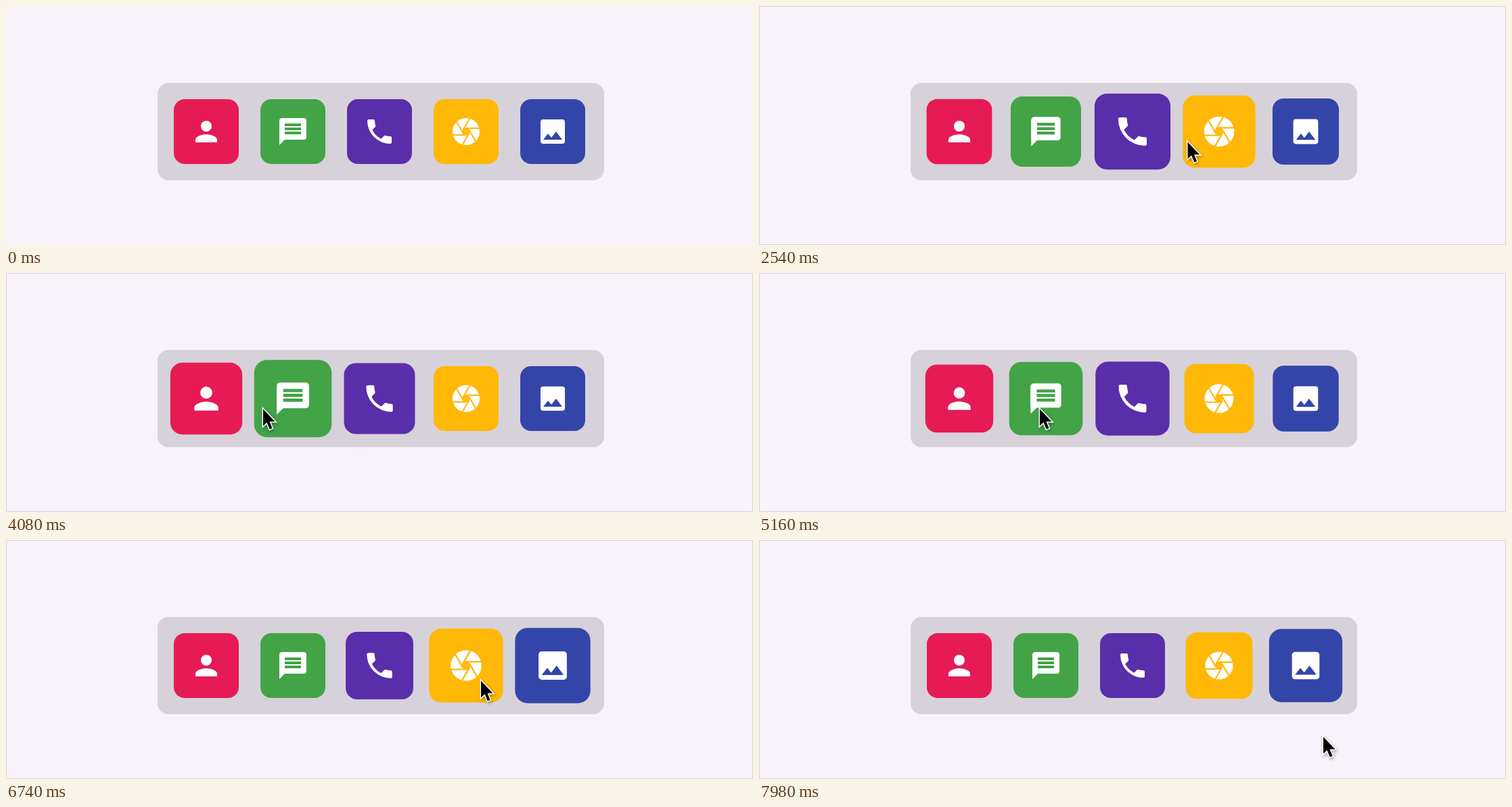
These frames come from a looping animation (1104x354 px, 8 s). An HTML page with a canvas:

```html
<!DOCTYPE html>
<html lang="en">
<head>
<meta charset="utf-8">
<title>Dock hover</title>
<style>
  html, body { margin: 0; width: 1104px; height: 354px; overflow: hidden; background: #f8f3fb; }
  canvas { display: block; }
</style>
</head>
<body>
<canvas id="stage" width="1104" height="354"></canvas>
<script>
const ctx = document.getElementById('stage').getContext('2d');
const LOOP = 8000, TRANSITION = 300, BORDER_AT = 2500, POINTER_AT = 1300;
const PAPER = '#f8f3fb', PANEL = '#d7d1da', WHITE = '#fff';
const FIRST_CELL = 232, PITCH = 128, MID_X = 552, MID_Y = 186, PANEL_BOTTOM = 256;

function fillRound(x, y, w, h, r, color) {
  ctx.fillStyle = color;
  ctx.beginPath();
  ctx.roundRect(x, y, w, h, r);
  ctx.fill();
}

function fillDisc(x, y, r) {
  ctx.fillStyle = WHITE;
  ctx.beginPath();
  ctx.arc(x, y, r, 0, 2 * Math.PI);
  ctx.fill();
}

function fillPath(d, color) {
  ctx.fillStyle = color;
  ctx.fill(new Path2D(d));
}

// Glyphs are drawn on a 24 unit grid; color is that of the tile behind.
function person() {
  fillDisc(12, 8, 4);
  fillPath('M12 14c-2.67 0-8 1.34-8 4v2h16v-2c0-2.66-5.33-4-8-4z', WHITE);
}

function message(color) {
  fillRound(2, 2, 20, 16, 2, WHITE);
  fillPath('M2 4V22L6 18L8 12Z', WHITE);
  for (let y = 6; y <= 12; y += 3) fillRound(6, y, 12, 2, 0, color);
}

function phone() {
  fillPath('M6.62 10.79q2.2 4.4 6.59 6.59l2.2-2.2q.45-.4 1.02-.24q1.7.57 3.57.57q1 0 1 1V20q0 1-1 1A17 17 0 0 1 3 4q0-1 1-1h3.5q1 0 1 1q0 1.9.57 3.57q.15.6-.25 1.02z', WHITE);
}

function shutter(color) {
  fillDisc(12, 12, 10);
  ctx.translate(12, 12);
  ctx.fillStyle = color;
  for (let i = 0; i < 6; i++) {
    ctx.rotate(Math.PI / 3);
    ctx.fillRect(0, -3, 10.5, 1);
    ctx.beginPath();
    ctx.moveTo(0, 0);
    ctx.lineTo(0, -3);
    ctx.lineTo(2.6, -1.5);
    ctx.fill();
  }
}

function picture(color) {
  fillRound(3, 3, 18, 18, 2, WHITE);
  fillPath('M8.5 13.5l2.5 3L14.5 12l4.5 6H5z', color);
}

const icons = [
  ['#e61b55', person], ['#43a347', message], ['#592eaa', phone],
  ['#ffb805', shutter], ['#3445aa', picture]
].map(([color, glyph], i) => ({ color, glyph, x: 296 + i * PITCH, steps: [] }));

const arrow = new Path2D('M0 0V25L5.5 19.8L9.8 30L13.6 28.4L9.5 18.4H17.5Z');

// Pointer way points as [time, position]: turns of each sweep and a few between.
const pathX = [
  [1300, 136], [1700, 147], [1800, 152], [2600, 640], [3103, 360], [3240, 276],
  [3440, 250], [3876, 360], [4080, 379], [4760, 720], [5160, 414], [5380, 252],
  [6440, 846], [6740, 701], [7100, 530], [7700, 850], [7980, 833]
];
const pathY = [
  [1300, 360], [1700, 319], [1800, 314], [2050, 200], [5160, 200],
  [6740, 207], [7700, 212], [7980, 290]
];

function slope(path, i) {
  const a = path[i], b = path[i + 1];
  return a && b ? (b[1] - a[1]) / (b[0] - a[0]) : 0;
}

// The harmonic mean of neighbouring slopes keeps the curve free of overshoot.
function tangent(path, i) {
  const before = slope(path, i - 1), after = slope(path, i);
  return before * after > 0 ? 2 * before * after / (before + after) : 0;
}

function along(path, t) {
  const next = path.findIndex(p => p[0] > t);
  if (next <= 0) return path.at(next)[1];
  const i = next - 1, a = path[i], b = path[next];
  const span = b[0] - a[0], u = (t - a[0]) / span, v = 1 - u;
  return a[1] * (1 + 2 * u) * v * v + b[1] * u * u * (3 - 2 * u)
    + span * u * v * (tangent(path, i) * v - tangent(path, next) * u);
}

// The CSS "ease" curve.
function ease(p) {
  if (p >= 1) return 1;
  let lo = 0, hi = 1;
  for (let i = 0; i < 20; i++) {
    const s = (lo + hi) / 2;
    if (0.75 * s * (1 - s) + s ** 3 < p) lo = s; else hi = s;
  }
  return 0.3 * lo * (1 - lo) ** 2 + 3 * lo * lo * (1 - lo) + lo ** 3;
}

function scaleAt(icon, t) {
  const step = icon.steps.findLast(s => s.t <= t);
  return step ? step.from + (step.to - step.from) * ease((t - step.t) / TRANSITION) : 1;
}

// Cells beyond either end stand for the pointer being off the icons.
function hoveredAt(t) {
  const x = along(pathX, t);
  if (along(pathY, t) >= PANEL_BOTTOM) return x < MID_X ? -2 : icons.length;
  return Math.max(-2, Math.floor((x - FIRST_CELL) / PITCH) - (x < FIRST_CELL));
}

// The hovered icon grows to 1.2, its neighbours to 1.1.
function planTransitions() {
  let current = -2;
  for (let t = 0; t < LOOP; t += 2) {
    const next = hoveredAt(t);
    if (next === current) continue;
    current = next;
    icons.forEach((icon, i) => {
      const to = 1 + Math.max(0, 2 - Math.abs(i - current)) / 10;
      icon.steps.push({ t, from: scaleAt(icon, t), to });
    });
  }
}

function drawIcon(icon, t) {
  const k = scaleAt(icon, t);
  ctx.save();
  ctx.translate(icon.x, MID_Y);
  ctx.scale(k, k);
  fillRound(-48, -48, 96, 96, 16, icon.color);
  ctx.scale(2, 2);
  ctx.translate(-12, -12);
  icon.glyph(icon.color);
  ctx.restore();
}

function drawPointer(t) {
  ctx.save();
  ctx.translate(along(pathX, t) + 1, along(pathY, t) + 1.5);
  ctx.lineWidth = 3;
  ctx.strokeStyle = WHITE;
  ctx.shadowColor = 'rgba(0, 0, 0, 0.35)';
  ctx.shadowBlur = 4;
  ctx.shadowOffsetX = 1;
  ctx.shadowOffsetY = 2;
  ctx.stroke(arrow);
  ctx.shadowColor = 'transparent';
  ctx.fillStyle = '#000';
  ctx.fill(arrow);
  ctx.restore();
}

function draw(t) {
  ctx.fillStyle = PAPER;
  ctx.fillRect(0, 0, 1104, 354);
  if (t >= BORDER_AT) {
    ctx.strokeStyle = PANEL;
    ctx.lineWidth = 1;
    ctx.strokeRect(0.5, 0.5, 1103, 353);
  }
  fillRound(224, 114, 660, 144, 16, PANEL);
  icons.forEach(icon => drawIcon(icon, t));
  if (t >= POINTER_AT) drawPointer(t);
}

planTransitions();
let start;
function frame(now) {
  start ??= now;
  draw((now - start) % LOOP);
  requestAnimationFrame(frame);
}
draw(0);
requestAnimationFrame(frame);
</script>
</body>
</html>
```
